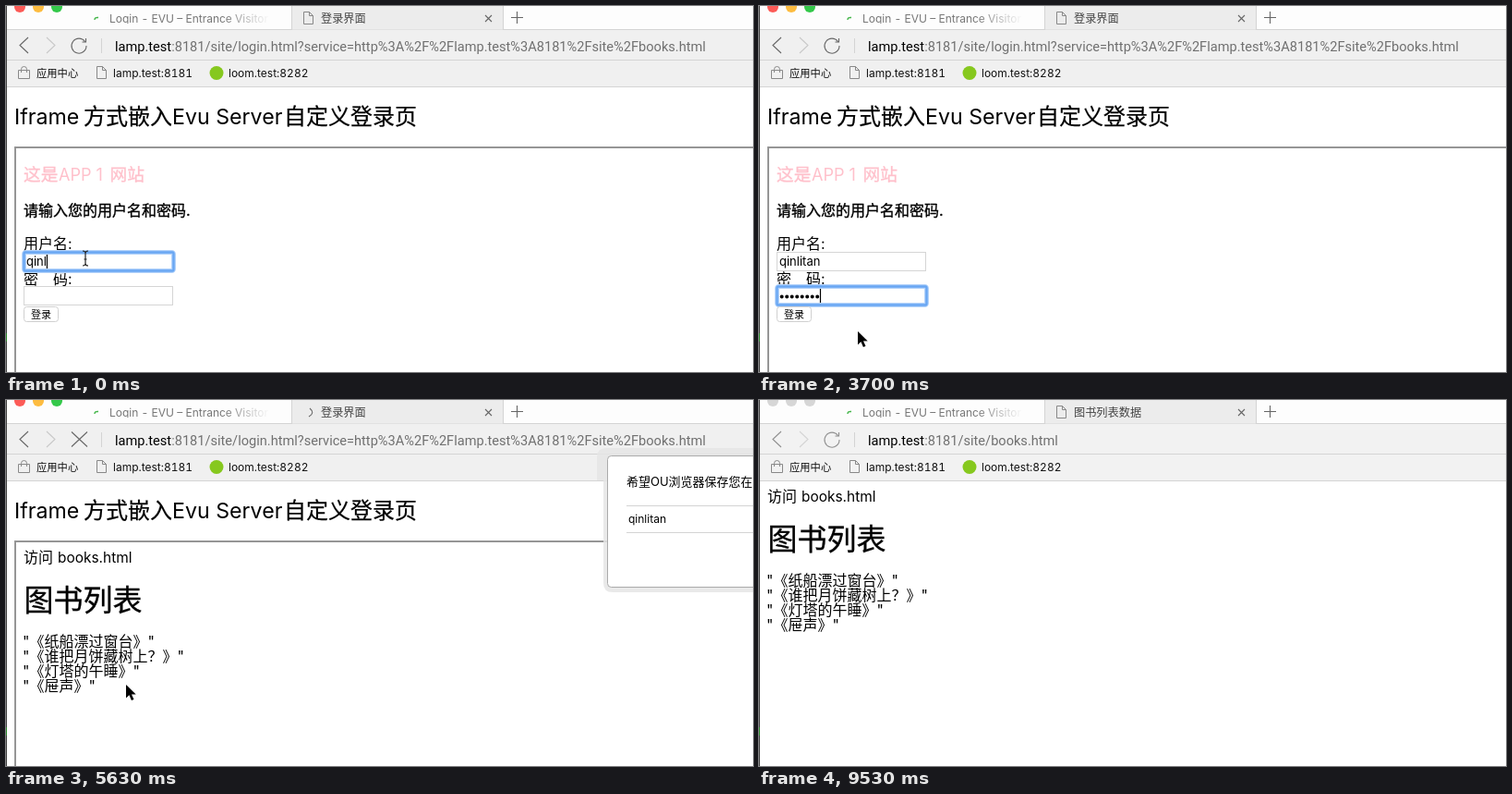
These frames come from a looping animation (809 px wide and 396 px high, 9570 ms). An HTML page:

```html
<!DOCTYPE html>
<html lang="zh-CN">
<head>
<meta charset="utf-8">
<title>登录演示</title>
<style>
html, body { margin: 0; width: 100%; height: 100%; overflow: hidden; background: #fff; }
svg { display: block; width: 809px; height: 396px; }
text { white-space: pre; text-spacing-trim: space-all; }
.ui { font-family: Inter, "Noto Sans CJK SC", sans-serif; font-variant-numeric: tabular-nums; }
.url { font-family: Roboto, sans-serif; font-size: 14.6px; fill: #707070; }
.page { font: 16px Inter, "Noto Sans CJK SC", sans-serif; }
.latin { font-size: .965em; stroke: none; }
.title { font-size: 24px; stroke: #000; stroke-width: .25px; }
.strong { stroke: currentColor; stroke-width: .35px; }
.icon { fill: none; stroke: #666; stroke-width: 1.1px; }
.small { stroke: #888; stroke-width: 1px; }
.pale { stroke: #c8c8c8; }
.rule { fill: none; stroke: #d4d4d4; }
.field rect { fill: #fff; stroke: #d5d5d5; }
.field .glow, .field .ring { fill: none; display: none; }
.field .glow { stroke: #b4d3fa; stroke-width: 5px; }
.field .ring { stroke: #69a7f3; stroke-width: 2.4px; }
.focus .glow, .focus .ring { display: inline; }
</style>
</head>
<body>
<svg viewBox="0 0 809 396" xmlns="http://www.w3.org/2000/svg">
  <defs>
    <linearGradient id="fade" gradientUnits="userSpaceOnUse" x1="235" x2="286" y1="0" y2="0">
      <stop stop-color="#777"/><stop offset="1" stop-color="#777" stop-opacity="0"/>
    </linearGradient>
    <clipPath id="tabClip"><rect x="110" width="174" height="19"/></clipPath>
    <path id="sheet" d="M.5.5h6l4 4v9h-10zM6.5.5v4h4"/>
  </defs>
  <rect id="paper" width="809" height="396"/>

  <g class="page">
    <g id="host">
      <text class="title" y="128"><tspan class="latin" x="9">Iframe</tspan><tspan x="84">方式嵌入</tspan><tspan class="latin" x="180">Evu Server</tspan><tspan x="301">自定义登录页</tspan></text>
      <path d="M809 153H10V396" fill="none" stroke="#969696" stroke-width="2"/>
    </g>
    <g id="form">
      <text class="strong" y="189" font-size="18.72" fill="#ffc0cb" color="#ffc0cb"><tspan x="19">这是</tspan><tspan class="latin" x="57">APP 1</tspan><tspan x="112.5">网站</tspan></text>
      <text class="strong" x="19" y="227">请输入您的用户名和密码.</text>
      <text x="19" y="263">用户名:</text>
      <text x="19" y="301">密　码:</text>
      <g id="userField" class="field" transform="translate(0 266)">
        <rect x="19.5" y=".5" width="161" height="20"/>
        <rect class="glow" x="19.5" y=".5" width="162" height="20" rx="2"/>
        <rect class="ring" x="19.5" y=".5" width="162" height="20" rx="1"/>
      </g>
      <g id="passField" class="field" transform="translate(0 303)">
        <rect x="19.5" y=".5" width="161" height="20"/>
        <rect class="glow" x="19.5" y=".5" width="162" height="20" rx="2"/>
        <rect class="ring" x="19.5" y=".5" width="162" height="20" rx="1"/>
      </g>
      <text id="user" class="ui" x="22" y="281" font-size="13"></text>
      <path id="dots" fill="none" stroke="#000" stroke-width="4" stroke-linecap="round" stroke-dasharray="0 5.5"/>
      <path id="caret" d="M0 0v15" stroke="#000" stroke-width="1.2"/>
      <rect id="button" x="19.5" y="325.5" width="37" height="16" rx="3" stroke="#d0d0d0"/>
      <text class="ui" x="27" y="338" font-size="11">登录</text>
    </g>
    <g id="books">
      <text y="176"><tspan x="19">访问</tspan><tspan class="latin" x="56">books.html</tspan></text>
      <text class="strong" x="19.5" y="228" font-size="32">图书列表</text>
      <text y="267"><tspan x="18">"《纸船漂过窗台》"</tspan><tspan x="18" dy="16">"《谁把月饼藏树上？》"</tspan><tspan x="18" dy="16">"《灯塔的午睡》"</tspan><tspan x="18" dy="16">"《屉声》"</tspan></text>
    </g>
  </g>

  <g class="ui">
    <rect width="809" height="26" fill="#fdfdfd"/>
    <rect x="309.5" y="-1" width="229" height="27" fill="#ececec" stroke="#d4d4d4"/>
    <rect id="toolbar" y="26" width="809" height="61"/>
    <path class="rule" d="M0 25.5H310M538 25.5H809M0 58.5H809M0 87.5H809"/>
    <g id="lights">
      <circle cx="15" cy="1" r="6"/><circle cx="35" cy="1" r="6"/><circle cx="55" cy="1" r="6"/>
    </g>
    <path d="M96 15q0-3 4-2.500" fill="none" stroke="#43b649" stroke-width="1.4"/>
    <text x="112" y="18" font-size="12" fill="url(#fade)" clip-path="url(#tabClip)">Login - EVU – Entrance Visitor Unit</text>
    <use id="tabSheet" class="icon small" href="#sheet" x="322" y="6"/>
    <path id="spinner" class="icon"/>
    <text id="tabTitle" x="341" y="18" font-size="12.2" fill="#444"></text>
    <path class="icon" d="M519 10l7 7m0-7l-7 7M547 12.500h13m-6.500-6.500v13"/>

    <g id="controls">
      <path class="icon" d="M24 34l-9 8.500 9 8.500"/>
      <path class="icon pale" d="M44 34l9 8.500-9 8.500"/>
      <path id="reload" class="icon" d="M85.500 38.500A8 8 0 1 0 87 43M86.500 35v4h-4"/>
      <path id="stop" class="icon" d="M71 34.500l17 16m0-16l-17 16"/>
    </g>
    <path class="rule" d="M103.500 35v16"/>
    <text class="url" x="118" y="49"><tspan fill="#000">lamp.test</tspan><tspan id="address"></tspan></text>

    <path class="icon small" d="M13.500 69.500h12v9h-12zM16.500 72v-3.500a3 3 0 0 1 6 0V72"/>
    <use class="icon small" href="#sheet" x="98" y="65"/>
    <circle cx="228" cy="72.500" r="7.500" fill="#86c81e"/>
    <g font-size="12" fill="#111">
      <text x="33" y="77" font-size="11.300">应用中心</text>
      <text x="116" y="77">lamp.test:8181</text>
      <text x="241" y="77">loom.test:8282</text>
    </g>
  </g>
  <path d="M.5 0V396" stroke="#444"/>
  <path d="M.5 354v9" stroke="#2b8a2b"/>

  <g id="popup" class="ui">
    <path d="M820 52H650q-10 0-10 10V87h7V198q0 10 10 10H820z" fill="#e6e6e6" fill-opacity=".85"/>
    <rect x="651.500" y="60.500" width="170" height="142" rx="4" fill="#fff" stroke="#aaa"/>
    <path class="rule" d="M672 114.500H809M672 143.500H809"/>
    <text x="672" y="93" font-size="13">希望OU浏览器保存您在</text>
    <text x="674" y="133" font-size="12">qinlitan</text>
  </g>

  <path id="beam" d="M-3-8q3 0 3 2.500q0-2.500 3-2.500M0-6V6M-3 8q3 0 3-2.500q0 2.500 3 2.500M-1.500 1h3" fill="none" stroke="#222" stroke-width="1.200"/>
  <path id="arrow" d="M0 0v14.500l3.400-3.200 2.500 5.700 2.600-1.100-2.500-5.500h4.700z" stroke="#fff" stroke-width="1.200" paint-order="stroke"/>
</svg>
<script>
const LOOP = 9570;
const USER = "qinlitan";
const PORT = ":8181/site/";
const LOGIN_URL = PORT + "login.html?service=http%3A%2F%2Flamp.test%3A8181%2Fsite%2Fbooks.html";
const USER_KEYS = [300, 450, 590, 740];
const PASS_KEYS = [1630, 1780, 1920, 2070, 2370, 2520, 2660, 2810];

// Pointer stops: time, x, y; a bare time hides the pointer.
const POINTER = [
  [0, 86, 273], [3260, 90, 284], [3410, 98, 318], [3560, 105, 344], [3700, 107, 352],
  [3850, 88, 349], [4000, 60, 338], [4140, 46, 331],
  [5490, 130, 308], [5640, 250, 279], [5780, 380, 248], [5930, 485, 227], [6070, 528, 219],
  [6820, 590, 206], [6970, 709, 191], [7110],
  [8750, 768, 330], [8900, 792, 376], [9050]
];
const LIGHTS = ["#fc5b57", "#fdbc40", "#34c84a"];

const el = {};
document.querySelectorAll("[id]").forEach(node => el[node.id] = node);
const show = (node, on) => node.style.display = on ? "inline" : "none";
const fill = (node, color) => node.setAttribute("fill", color);
const move = (node, x, y) => node.setAttribute("transform", `translate(${x} ${y})`);
const passed = (times, t) => times.filter(time => t >= time).length;

function drawForm(t) {
  const inUser = t < 1030;
  const inPass = !inUser && t < 4290;
  const dots = passed(PASS_KEYS, t);
  el.user.textContent = USER.slice(0, 4 + passed(USER_KEYS, t));
  el.userField.classList.toggle("focus", inUser);
  el.passField.classList.toggle("focus", inPass);
  show(el.dots, dots);
  el.dots.setAttribute("d", `M24.7 314.5h${Math.max(0, dots - 1) * 5.5 + .1}`);
  const blink = t >= 1480 && t < 1630;
  show(el.caret, (inUser || inPass) && !blink);
  if (inUser) move(el.caret, 22.5 + el.user.getComputedTextLength(), 269);
  else move(el.caret, 22.5 + dots * 5.5, 306);
  fill(el.button, t >= 4290 ? "#e4e4e4" : "#fff");
}

function drawPointer(t) {
  const [, x, y] = POINTER.findLast(stop => t >= stop[0]);
  const beam = t < 3410;
  show(el.beam, beam);
  show(el.arrow, !beam && x !== undefined);
  if (x !== undefined) move(beam ? el.beam : el.arrow, x, y);
}

function draw(t) {
  const submitted = t >= 4590;
  const opened = t >= 5640;
  const loading = t >= 4440 && t < 6220;
  const inactive = t >= 9530;

  show(el.host, !opened);
  show(el.form, !submitted);
  show(el.books, submitted);
  move(el.books, opened ? -10 : 0, opened ? -66 : 0);
  if (!submitted) drawForm(t);

  el.address.textContent = opened ? PORT + "books.html" : LOGIN_URL;
  el.tabTitle.textContent = t < 6220 ? "登录界面" : "图书列表数据";
  show(el.tabSheet, !loading);
  show(el.spinner, loading);
  el.spinner.setAttribute("d", opened ? "M324 17q6 2 8-4" : "M329 9q6 5-1 9");
  show(el.reload, !loading);
  show(el.stop, loading);
  fill(el.paper, opened && !inactive ? "#fcfcfc" : "#fff");
  fill(el.toolbar, inactive ? "#f2f2f2" : opened ? "#f9f9f9" : "#f0f0f0");
  el.controls.setAttribute("opacity", inactive ? .7 : 1);
  [...el.lights.children].forEach((light, i) => fill(light, inactive ? "#d6d6d6" : LIGHTS[i]));

  show(el.popup, t >= 4890 && t < 8160);
  el.popup.setAttribute("opacity", t >= 8010 ? .5 : 1);
  drawPointer(t);
}

const start = performance.now();
function tick() {
  draw((performance.now() - start) % LOOP);
  requestAnimationFrame(tick);
}
tick();
</script>
</body>
</html>
```
